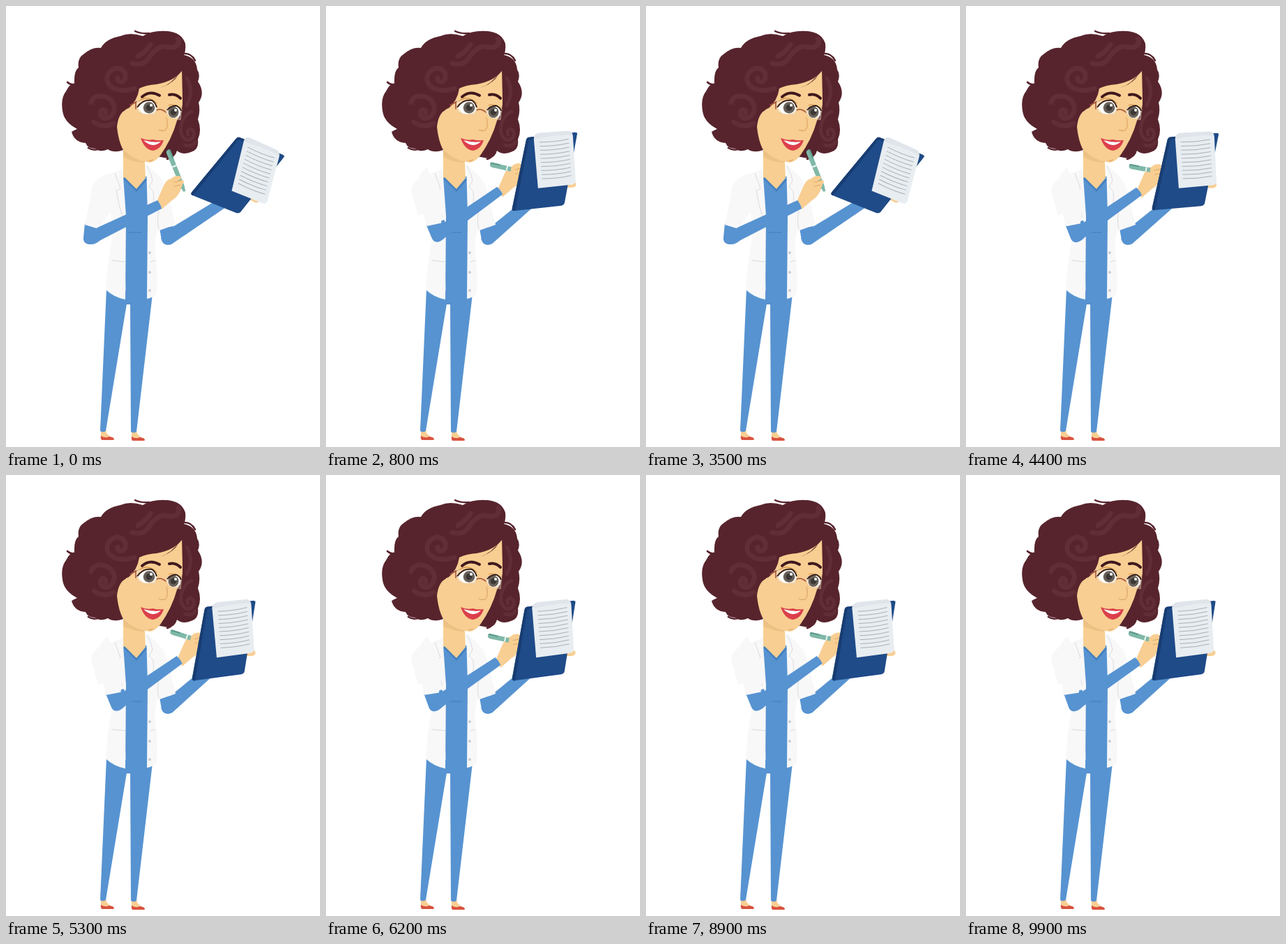
Animation of 450x631 px, one loop 10000 ms. Source, as an HTML page:

```html
<!DOCTYPE html>
<html lang="en">
<head>
<meta charset="utf-8">
<title>Doctor with clipboard</title>
<style>
html, body { margin: 0; width: 100%; height: 100%; overflow: hidden; background: #fff; }
svg { display: block; width: 450px; height: 631px; }
.hair { fill: #57242d; }
.curl { fill: none; stroke: #612d36; stroke-width: 7; stroke-linecap: round; }
.strand { fill: none; stroke: #57242d; stroke-width: 2.5; stroke-linecap: round; }
.skin { fill: #f8ce92; }
.shade { fill: #edc184; }
.crease { fill: none; stroke: #dfa968; stroke-width: 1.3; stroke-linecap: round; }
.coat { fill: #f8f8f9; }
.seam { fill: none; stroke: #d9dbde; stroke-width: 1; }
.blue { fill: #5793d1; }
.fold { fill: none; stroke: #4680bd; stroke-width: 1.3; }
.brow { fill: none; stroke: #40191e; stroke-width: 4; stroke-linecap: round; }
.frame { fill: none; stroke: #a4533d; stroke-width: 1.6; stroke-linecap: round; }
.lens { fill: #fff; fill-opacity: .3; stroke: #d8c2a0; stroke-width: .6; }
.shoe { fill: #d9523f; }
.rule { fill: none; stroke: #a3a9b0; stroke-width: .9; }
</style>
</head>
<body>
<svg viewBox="0 0 450 631">
  <!-- legs -->
  <path class="skin" d="M136 606h7l1 5 6 6h-14zM180 607h7l1 5 6 6h-14z"/>
  <path class="shoe" d="M136 615Q142 619 148 616Q155 617 155 620Q155 621 153 621H137Q135 618 136 615zM180 616Q186 620 192 617Q199 618 199 621Q199 622 197 622H181Q179 619 180 616z"/>
  <path class="blue" d="M144 404L210 412L187 609Q183 612 179 609L178 426H173L143 608Q139 611 135 608z"/>

  <!-- far arm -->
  <path id="farArm" class="blue" d="M239 316L300 279L315 288L237 341Q225 344 222 332z"/>
  <path class="blue" d="M220 318L240 315L244 330L236 341Q226 344 223 335z"/>
  <path class="coat" d="M200 228Q224 240 231 265L243 313L220 321L208 280z"/>

  <!-- head, back part -->
  <path class="hair" d="M136 60Q143 47 164 43Q178 37 196 43Q210 34 232 36Q252 38 257 54Q258 64 255 70Q273 74 274 91Q279 98 275 108Q286 124 276 138Q279 150 275 162Q281 178 275 191Q277 206 265 209Q253 214 245 207Q243 217 232 218L168 206Q155 211 146 205Q135 210 128 204Q117 204 114 196Q98 195 94 180Q99 177 102 176Q83 166 81 150Q78 132 86 122Q92 110 98 111Q97 93 104 88Q102 75 111 69Q124 58 136 60z"/>
  <path class="strand" d="M256 68Q266 68 271 78M185 36Q193 40 205 39M88 109Q94 115 103 110M240 211Q238 217 231 219M98 184Q104 190 113 186M118 203Q126 208 134 204"/>

  <!-- torso -->
  <path class="blue" d="M167 244H204L207 420L178 427H172z"/>
  <path class="coat" d="M168 232L152 240Q136 260 149 296Q154 320 151 340Q144 376 143 406Q155 417 171 420L172 300L168 244zM201 226L211 235Q230 255 222 300Q215 326 213 345Q218 375 216 411Q212 417 202 419L203 300z"/>
  <path class="skin" d="M168 200H198L200 246L187 262L168 246z"/>
  <path class="shade" d="M168 204Q180 219 198 222V224Q180 223 168 216z"/>
  <path class="fold" style="stroke-width:2.6" d="M169 246L187 264L201 248"/>
  <path class="fold" d="M175 324H195"/>
  <path class="seam" d="M156 239Q160 250 164 261L158 264Q161 284 167 302M202 229Q209 240 210 250L205 259L211 265Q213 283 207 298M152 364L171 366M207 366L214 364M219 293Q216 305 219 320"/>
  <g fill="#c8cbd0"><circle cx="206" cy="353" r="1.9"/><circle cx="206" cy="381" r="1.9"/><circle cx="206" cy="407" r="1.9"/></g>

  <!-- head -->
  <path class="skin" d="M158 158Q159 190 168 206Q186 222 206 224Q214 223 221 214Q238 190 245 164Q254 150 253 132L252 91L205 108L182 122L172 148z"/>
  <path class="hair" d="M252 93Q240 108 216 112Q201 113 191 118Q188 136 176 146Q161 151 159 173L140 165L150 100L200 78L256 62z"/>
  <path class="hair" d="M248 96Q237 112 221 117Q234 113 243 104z"/>
  <path class="curl" d="M184 118C158 127 138 112 147 97C156 82 174 91 171 103C168 112 158 109 160 103M122 138C126 122 154 128 155 145C156 162 136 166 135 153C135 146 144 147 143 153M126 166Q140 176 154 168"/>
  <path class="curl" d="M181 82C204 89 205 67 216 62C226 54 233 61 239 59Q250 57 247 47M189 72Q200 66 207 55"/>
  <path class="curl" style="stroke-width:5" d="M266 151C254 156 249 171 251 181C255 198 271 192 269 181C266 172 257 178 261 184M259 103Q270 122 259 142M257 199Q267 202 271 195"/>
  <path class="brow" d="M195 130Q206 120 220 128M234 127Q243 125 250 132"/>
  <path class="crease" style="stroke:#d69b54" d="M189 137Q203 126 216 139M233 142Q243 139 251 147"/>
  <path class="lens" d="M186 135L214 139L214 156L191 153Q186 150 186 135zM230 145L252 147L250 163L234 159Q229 156 230 145z"/>
  <path fill="#fff" d="M189 146Q196 135 208 136Q215 139 216 149Q207 157 196 154zM231 152Q235 143 245 144Q251 148 250 156Q243 163 235 159z"/>
  <g fill="#68605a"><circle cx="205" cy="145.500" r="8.300"/><ellipse cx="240" cy="152" rx="7.500" ry="8"/></g>
  <g fill="#3d3836"><circle cx="205" cy="145.500" r="4.500"/><circle cx="240" cy="152" r="4.300"/></g>
  <g fill="#fff"><circle cx="208" cy="142" r="2"/><circle cx="243" cy="149" r="1.900"/></g>
  <path fill="none" stroke="#352020" stroke-width="2" d="M188 145Q196 133 209 135Q214 138 216 145M231 149Q236 142 245 143Q250 146 251 150"/>
  <path class="frame" d="M178 142L187 137M216 149Q222 146 229 152M186 137V147"/>
  <path class="crease" d="M230 160Q233 171 229 177Q225 180 219 177M205 221Q208 222 210 220"/>
  <path fill="#dc3f4b" d="M193 189Q203 193 210 191Q218 193 226 192Q222 205 211 207Q199 206 193 189z"/>
  <path fill="#fff" d="M197 192Q211 196 222 194Q217 199 210 199Q203 198 197 192z"/>

  <!-- near arm -->
  <path class="coat" d="M153 239Q126 244 122 264L132 300L155 290z"/>
  <g id="hand">
    <path class="skin" d="M216 280Q222 266 226 257Q231 246 239 247L252 249Q254 258 249 266Q246 273 238 278L223 291z"/>
    <g id="pen">
      <path fill="#7fb8a8" d="M-45 -2Q-45 -4 -41 -3.500L10 -3L19 -1.500V1.500L10 3L-41 3.500Q-45 3 -45 0z"/>
      <path fill="#5f9c8d" d="M-41 -3.500L-31 -3.300V-1.300H-45Q-45 -4 -41 -3.500z"/>
      <path fill="#eef6f3" d="M-21 -3.300h2v6.500h-2z"/>
    </g>
    <path class="skin" d="M235 249Q240 242 247 243Q252 244 251 247Q248 250 242 252L253 249Q257 251 253 255Q252 261 247 262L234 262z"/>
    <path class="crease" style="stroke-width:1" d="M241 252L250 250M241 258L250 256"/>
  </g>
  <path id="cuff" class="blue" d="M113 311L139 317L136 334Q129 342 119 341Q110 340 111 331z"/>
  <path id="sleeve" class="coat" d="M153 239Q130 245 123 266L113 313L133 319L154 288z"/>
  <path id="foreArm" class="blue" d="M120 326L131 317L217 278Q222 284 223 290L124 341z"/>

  <!-- clipboard -->
  <g id="board">
    <path class="skin" d="M336 249L357 253Q359 259 352 260L340 260z"/>
    <path fill="#1f4b88" d="M291 188Q287 188 286 192L266 289Q265 294 270 293L336 286Q340 285 341 282L359 184Q360 181 356 181z"/>
    <path fill="#183d73" d="M291 188Q287 188 286 192L266 289Q265 294 270 293L290 192L300 190V187z"/>
    <g id="paper">
      <path fill="#e8edf1" d="M297 191Q297 183 304 182L346 179Q352 179 353 186L357 252Q355 256 350 256L303 261z"/>
      <path fill="#dfe5ea" d="M297 191Q297 183 304 182L346 179Q351 179 352 185Q334 183 297 191z"/>
      <path id="rules" class="rule"/>
    </g>
  </g>
</svg>
<script>
const LOOP = 10000, CYCLE = 3640;
const IN = [88, 908], OUT = [2607, 3427];
const shoulder = [141, 258], elbow = [122, 328], wrist = [219, 285];
const $ = id => document.getElementById(id);
const [farArm, hand, pen, cuff, sleeve, foreArm, board, paper] =
  ['farArm', 'hand', 'pen', 'cuff', 'sleeve', 'foreArm', 'board', 'paper'].map($);

const ramp = (x, a, b) => Math.min(1, Math.max(0, (x - a) / (b - a)));
const ease = (x, a, b) => { const u = ramp(x, a, b); return u * u * (3 - 2 * u); };
const move = (el, value) => el.setAttribute('transform', value);
const shift = (x, y) => `translate(${x} ${y}) `;
const spin = (a, p) => `rotate(${a} ${p[0]} ${p[1]})`;

function turn([x, y], [cx, cy], deg) {
  const r = deg * Math.PI / 180, c = Math.cos(r), s = Math.sin(r);
  return [cx + (x - cx) * c - (y - cy) * s, cy + (x - cx) * s + (y - cy) * c];
}

let lines = '';
for (let i = 0; i < 10; i++) {
  const x = 305 + i * .4, y = 195 + i * 5.8;
  lines += `M${x} ${y}Q${x + 22} ${y} ${x + 42} ${y - 4.5}`;
}
$('rules').setAttribute('d', lines);

function draw(ms) {
  const t = (ms % LOOP) % CYCLE;
  const leave = 1 - ease(t, ...OUT);
  const k = ease(t, ...IN) * leave;            // 0 thinking, 1 writing
  const drift = ramp(t, IN[1], OUT[0]);
  const arm = k * (1 - .16 * drift);

  move(farArm, spin(-8 * k, [231, 331]));

  // the shoulder lifts a little as the arm swings forward
  const liftX = 2 * k, liftY = -5 * k;
  const upper = -30 * arm, fore = -10 * arm;
  const e = turn(elbow, shoulder, upper);
  const dx = e[0] - elbow[0] + liftX, dy = e[1] - elbow[1] + liftY;
  const w = turn(wrist, elbow, fore);
  const swing = shift(liftX, liftY) + spin(upper, shoulder);
  move(cuff, swing);
  move(sleeve, swing);
  move(foreArm, shift(dx, dy) + spin(fore, elbow));
  move(hand, shift(dx + w[0] - wrist[0] + k, dy + w[1] - wrist[1] + 2 * k));

  const wiggle = 3.8 * ramp(t, 800, 1000) * Math.cos((t - 2490) / 160 * 2 * Math.PI);
  const tilt = 68 + leave * (-60 * ease(t, IN[0], 700) + 7.5 * ease(t, 680, 880) + wiggle);
  move(pen, shift(248.7, 247.8 + 7 * k) + `rotate(${tilt})`);

  move(board, shift(-1 + 2 * k, -23 + 24 * k) + spin(28 - 29.4 * k, [267, 292]));
  const skew = .17 - .1786 * k - .02 * drift * k;
  move(paper, `matrix(1 0 ${skew} 1 ${-187 * skew} 0)`);
}

const start = performance.now();
function tick() {
  draw(performance.now() - start);
  requestAnimationFrame(tick);
}
tick();
</script>
</body>
</html>
```
